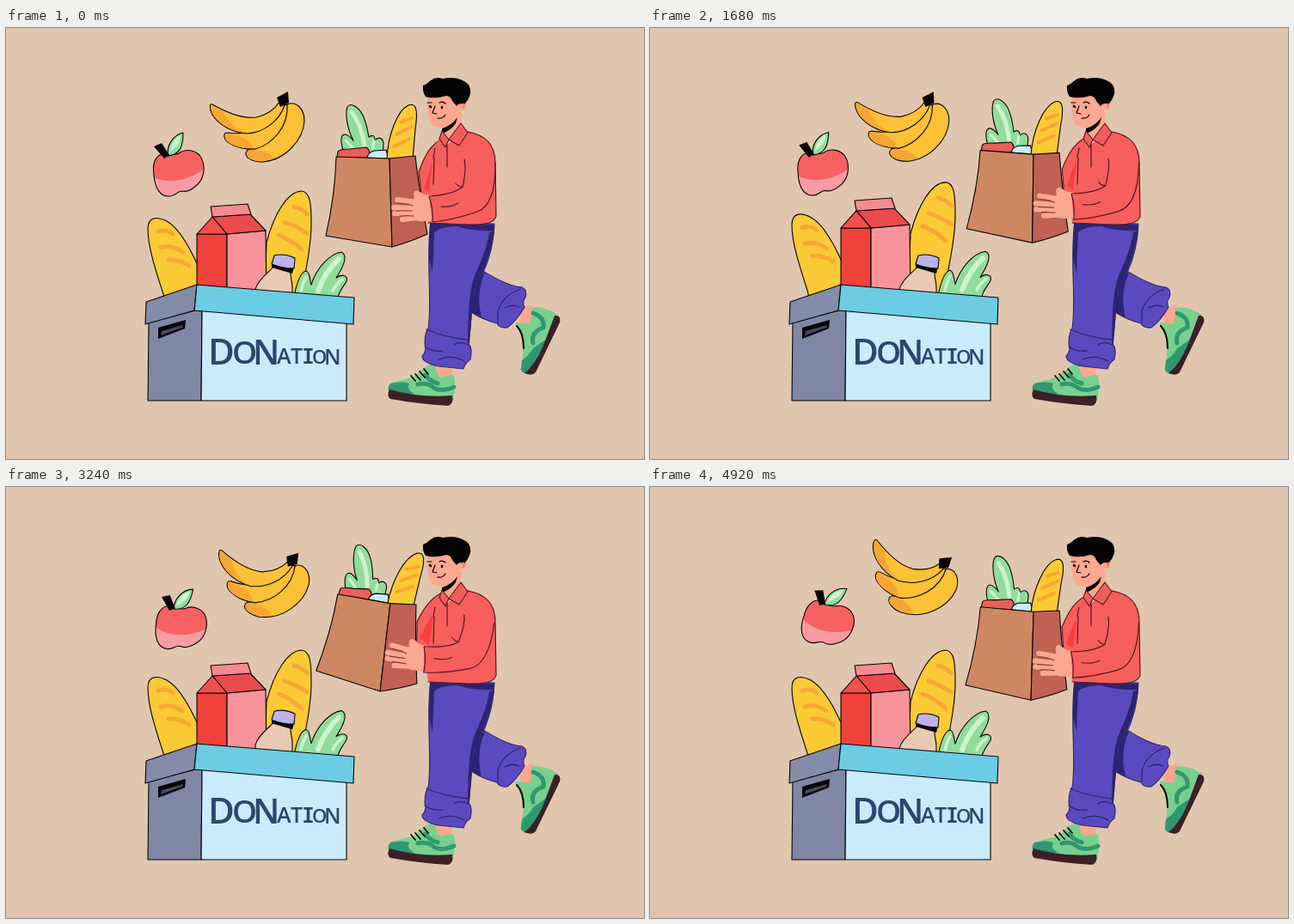
These frames come from a looping animation (742 by 502 pixels, 4.94 s). An HTML page with a canvas:

```html
<!DOCTYPE html>
<html lang="en">
<head>
<meta charset="utf-8">
<title>Food donation</title>
<style>
html, body { margin: 0; width: 100%; height: 100%; overflow: hidden; background: #e1c6af; }
canvas { display: block; width: 742px; height: 502px; }
</style>
</head>
<body>
<canvas id="stage" width="742" height="502"></canvas>
<script>
const ctx = document.getElementById('stage').getContext('2d');
const LOOP = 4940;
const INK = '#060405';
const COLOR = {
  bg: '#e1c6af', yellow: '#fcca35', banana: '#fcc136', amber: '#f8a633', leaf: '#90dc9c', pale: '#d0f2cd',
  shirt: '#f65f5c', shirtLine: '#5a1520', skin: '#faa88f', purple: '#5b4abf', navy: '#2c2470',
  green: '#79d08d', deep: '#309871', sole: '#3c2025'
};

const cache = new Map();
function path(d) {
  if (!cache.has(d)) cache.set(d, new Path2D(d));
  return cache.get(d);
}
function fill(color, d) {
  ctx.fillStyle = color;
  ctx.fill(path(d));
}
function line(d, color = INK, width = 1.1) {
  ctx.strokeStyle = color;
  ctx.lineWidth = width;
  ctx.stroke(path(d));
}
function shape(color, d, ink = INK, width = 1.1) {
  fill(color, d);
  line(d, ink, width);
}
function moved(dy, draw) {
  ctx.save();
  ctx.translate(0, dy);
  draw();
  ctx.restore();
}
function turned(x, y, degrees, draw) {
  ctx.save();
  ctx.translate(x, y);
  ctx.rotate(degrees * Math.PI / 180);
  ctx.translate(-x, -y);
  draw();
  ctx.restore();
}

// The clock advances three poses every 140 ms: two short, one long.
function poseAt(ms) {
  const u = ms + 20;
  return Math.floor(u / 140) * 3 + Math.min(2, Math.floor(u % 140 / 20));
}
const swing = (n, start, half) => (1 - Math.cos(Math.PI * (n - start) / half)) / 2;
function hop(n, peak, height) {
  const d = (n - peak) / 40;
  return Math.abs(d) < 0.5 ? -height * Math.cos(Math.PI * d) ** 2 : 0;
}

function bananas() {
  shape(COLOR.banana, 'M281 142C302 138 325 118 327 89C338 84 347 95 347 108C346 130 325 154 298 156C285 156 278 150 279 145Z');
  fill(COLOR.amber, 'M281 143C292 141 304 143 312 152C300 157 278 155 280 146Z');
  shape(COLOR.banana, 'M258 122C278 125 306 119 321 91L327 89C329 115 310 135 290 141C270 142 255 134 254 127C253 123 255 122 258 122Z');
  fill(COLOR.amber, 'M256 123C270 125 282 127 288 140C265 141 253 132 255 125Z');
  shape(COLOR.banana, 'M240 89C254 97 275 106 291 104C304 101 313 94 318 86L324 90C318 108 300 122 280 123C256 121 241 106 238 96C236 90 238 88 240 89Z');
  fill(COLOR.amber, 'M239 90L253 97C257 107 264 116 279 122C256 120 241 106 239 96Z');
  fill(INK, 'M315 81L328 74L329 87L319 92Z');
}
function apple() {
  const body = 'M184 146C173 148 170 159 172 171C173 187 180 197 190 196C197 196 199 190 204 190C212 192 218 187 223 182C232 173 232 157 225 148C218 141 207 141 201 146C196 149 190 146 184 146Z';
  fill('#f86163', body);
  ctx.save();
  ctx.clip(path(body));
  fill('#f89ba2', 'M170 173C187 182 210 179 232 163L234 200H170Z');
  ctx.restore();
  line(body);
  shape('#8fdf9f', 'M189 149C186 139 193 125 206 122C206 137 203 147 189 149Z');
  fill(COLOR.pale, 'M191 145C191 135 197 128 203 125C203 135 197 138 191 145Z');
  fill(INK, 'M172 138L181 134L190 148L184 152Z');
}

function leftBread() {
  shape(COLOR.yellow, 'M190 340L183 310C175 285 165 256 165 234C165 220 175 219 187 225C202 233 218 262 232 298L248 340Z');
  line('M177 237Q187 234 194 240M180 256Q193 252 205 261M189 270Q203 269 213 277', COLOR.amber, 5);
}
function rightBread() {
  shape(COLOR.yellow, 'M300 330L303 250C312 215 328 191 343 190C354 190 355 205 355 228C355 255 348 285 340 330Z');
  line('M335 208Q344 210 350 217M324 226Q339 231 350 239M317 241Q332 247 344 258', COLOR.amber, 5);
}
function milk() {
  shape('#f0413b', 'M222 240L257 240L257 320L222 320Z');
  shape('#f7939b', 'M257 240L302 236L303 320L257 320Z');
  shape('#ec4b4d', 'M240 220L284 217L302 236L257 240Z');
  shape('#f2504d', 'M222 240L240 220L257 240Z');
  shape('#f68a91', 'M238 208L281 205L285 217L240 220Z');
}
function bottle() {
  shape('#e8c9b4', 'M312 277C307 284 294 291 290 304L290 330L333 330L333 302C333 294 330 290 331 282Z');
  fill(INK, 'M309 273L335 278L333 286L309 279Z');
  shape('#bbb2ec', 'M312 265Q324 262 336 268L335 280Q321 280 309 275Z');
}
function lettuce() {
  shape(COLOR.leaf, 'M332 330C336 302 342 284 349 283C354 284 353 294 355 299C361 280 376 263 390 261C397 264 395 274 384 291C391 286 398 288 396 295C392 303 385 306 383 330Z');
  line('M363 306Q371 284 387 269', COLOR.pale, 6);
  line('M343 306Q345 297 349 290M380 306Q384 298 391 293', COLOR.pale, 3.5);
}

function box() {
  shape('#7f87a5', 'M166 343L228 327L227 434L165 434Z');
  shape('#caebfb', 'M228 328L396 342L396 434L227 434Z');
  shape('#838ca9', 'M163 319L222 299L219 329L162 345Z');
  shape('#6bcce3', 'M222 299L405 314L404 345L219 329Z');
  fill(INK, 'M177 349L209 340L208 350L177 362Z');
  fill('#454a63', 'M181 353L206 346L205 349L180 358Z');

  // letter, left edge, baseline, size
  const letters = [
    ['D', 235, 392, 42], ['O', 263, 391, 37], ['N', 287, 392, 40],
    ['A', 315, 391, 25], ['T', 331, 391, 25], ['I', 344, 391, 25],
    ['O', 356, 391, 22], ['N', 370, 392, 25]
  ];
  ctx.fillStyle = '#2f456f';
  for (const [char, x, y, size] of letters) {
    const family = char === 'I' ? '"Noto Sans Mono", monospace' : '"Open Sans", sans-serif';
    ctx.font = `600 ${size}px ${family}`;
    ctx.fillText(char, x, y);
  }
}

function shoes() {
  fill(COLOR.skin, 'M600 326L613 322L612 345L596 347Z');
  fill(COLOR.green, 'M593 343L608 345Q613 337 611 326Q624 323 642 334L638 352L611 403Q601 404 598 398Q602 385 601 370Q600 354 593 347Z');
  fill(COLOR.deep, 'M600 387Q609 381 613 373L629 362L611 403Q600 404 599 397Z');
  line('M613 332Q627 337 625 349Q610 354 613 367', COLOR.deep, 5);
  line('M594 347Q602 355 602 373', INK, 2);
  fill(COLOR.sole, 'M638 335Q646 334 644 343L616 401Q612 406 603 402Q615 393 625 370Z');

  fill(COLOR.skin, 'M496 390L519 395L518 411L492 409Z');
  fill(COLOR.green, 'M489 394Q496 390 500 394Q499 403 506 407Q515 403 521 405Q524 417 520 434L447 425Q443 421 447 414Q463 409 475 406Z');
  fill(COLOR.deep, 'M447 414Q460 411 469 414Q465 422 477 427L447 424Q442 420 447 414Z');
  line('M479 415Q490 412 499 420Q508 424 521 418M488 404Q492 411 502 414', COLOR.deep, 5);
  line('M471 405L476 411M476 403L482 410M481 400L487 407M486 397L491 403', INK, 1.7);
  fill(COLOR.sole, 'M446 421Q442 428 447 432Q480 438 514 440Q521 438 519 428Q480 431 446 421Z');
}
function trousers() {
  shape(COLOR.purple, 'M553 282C570 292 585 301 600 302Q607 305 604 314Q600 319 603 325Q594 341 583 349Q574 350 571 344Q555 340 541 331L540 295Z', COLOR.navy);
  fill(COLOR.navy, 'M548 288L557 285Q546 309 553 337L541 331Z');
  line('M598 304Q577 312 572 330L572 343M580 326Q588 321 597 325', COLOR.navy, 1.3);

  shape(COLOR.purple, 'M494 226L568 228C567 258 557 285 544 305C541 335 540 352 538 368Q543 373 540 386Q534 390 532 397L503 394Q484 390 484 382Q490 376 487 368Q487 355 491 350C496 320 488 265 494 226Z', COLOR.navy);
  fill(COLOR.navy, 'M493 227L568 229L567 236Q540 237 525 231Q506 231 498 238Q497 262 496 285L492 268Z');
  fill(COLOR.navy, 'M568 236C564 262 555 286 544 305L539 368L537 367C538 330 538 304 547 284C555 266 560 252 562 238Z');
  line('M489 351Q508 360 538 363M487 371Q497 378 508 376M538 369Q527 364 521 369M503 386Q518 380 533 388', COLOR.navy, 1.3);
}

function farSleeve() {
  shape(COLOR.shirt, 'M511 127C494 134 486 150 480 168L484 200L502 197L507 142Z', COLOR.shirtLine);
  fill('#f9403f', 'M496 158Q490 173 486 187L497 193L499 166Z');
}
function head() {
  fill(COLOR.skin, 'M512 106L530 97L528 119L512 134L507 122Z');
  fill(INK, 'M507 117Q518 114 525 104L523 111Q518 119 507 123Z');
  fill(COLOR.skin, 'M490 77L529 78L530 84Q537 83 536 90Q535 97 528 95Q524 109 512 114Q500 119 494 111Q490 101 490 90Z');
  fill(INK, 'M488 80Q484 74 485 67Q490 65 494 61Q500 56 508 59Q527 55 538 66Q543 74 537 84L533 89Q527 86 524 91L519 85Q517 79 512 79Q499 83 488 80Z');
  line('M493 91L494 92M507 92L507 93', INK, 2.5);
  line('M499 91L496 99L501 100M502 105Q508 106 511 101M490 87L495 87M504 87Q508 85 511 88', INK, 1.2);
  line('M530 89Q535 86 532 93', '#e1705d', 1.3);
}
function torso() {
  fill(COLOR.shirt, 'M507 125L514 135L532 119C554 123 568 133 569 155L570 219Q569 229 538 229L491 227L489 211L496 158Q496 137 507 125Z');
  line('M536 121C557 124 569 135 569 157L570 219Q568 230 538 229L491 227M497 182L498 151', COLOR.shirtLine, 1.2);
  line('M513 136L513 162M497 151L499 140', COLOR.shirtLine, 1.2);
  shape('#f05f5b', 'M507 120L515 130L511 139L504 129Z', COLOR.shirtLine);
  shape('#f05f5b', 'M529 111L537 122L527 137L515 130Z', COLOR.shirtLine);
}
function bag() {
  shape(COLOR.leaf, 'M394 147C389 136 388 124 394 124C398 124 401 128 404 131C397 118 394 100 397 92C401 86 411 92 416 104C420 114 421 122 422 127C426 124 429 125 429 131C433 126 438 128 439 134L438 150Z');
  line('M402 98Q413 112 417 137', COLOR.pale, 5);
  line('M395 131L405 141M428 131L427 140', COLOR.pale, 3);
  shape('#ea5f5a', 'M385 151L386 144Q387 141 400 141L419 139Q424 142 423 151Z');
  shape('#caebfb', 'M420 151Q421 145 428 143L442 142L445 152Z');
  shape(COLOR.yellow, 'M443 153C444 125 455 96 468 90C478 86 479 98 476 118L473 153Z');
  line('M459 110L472 105M454 124L472 115M451 138L469 129', COLOR.amber, 4);
  shape('#cd8862', 'M384 150L446 152L449 255L372 242C377 220 383 188 384 150Z');
  shape('#c16153', 'M446 152L476 149Q480 185 490 240Q473 248 449 255Z');
}
function nearArm() {
  line('M455 200L478 203M451 209L476 210M452 216L476 216M461 223L480 221', COLOR.skin, 6);
  fill(COLOR.skin, 'M497 195L487 194L478 189Q472 190 475 198L468 207L470 219L480 225L497 225Z');
  line('M455 204Q465 204 473 207M454 213L472 213M458 219Q466 218 474 219', '#8f3a38', 1.2);
  fill(COLOR.shirt, 'M534 150L568 156C570 189 566 207 548 214C530 219 512 226 496 226L492 196C507 197 521 193 531 186Z');
  line('M533 153Q536 164 531 185Q520 194 492 196Q497 210 496 226Q519 224 548 214Q570 206 569 157', COLOR.shirtLine, 1.2);
  line('M531 185Q526 185 523 181M506 208Q518 209 526 204', COLOR.shirtLine, 1.1);
}

function draw(n) {
  ctx.fillStyle = COLOR.bg;
  ctx.fillRect(0, 0, 742, 502);
  const drift = 26.2 * (swing(n, 13.5, 120) - swing(1, 13.5, 120));
  turned(320, 136, drift, bananas);
  turned(226, 178, drift, apple);

  moved(hop(n, 47.5, 10), leftBread);
  moved(hop(n, 35.5, 10.5), rightBread);
  moved(hop(n, 41.5, 8), milk);
  moved(hop(n, 59.5, 10), bottle);
  moved(hop(n, 53.5, 11), lettuce);
  box();

  const lift = 9 * (swing(n, 12, 62) - swing(1, 12, 62));
  shoes();
  trousers();
  turned(560, 150, lift, farSleeve);
  head();
  torso();
  turned(560, 150, lift, () => {
    bag();
    nearArm();
  });
}

ctx.lineJoin = ctx.lineCap = 'round';
function tick() {
  draw(poseAt(performance.now() % LOOP));
  requestAnimationFrame(tick);
}
tick();
</script>
</body>
</html>
```
